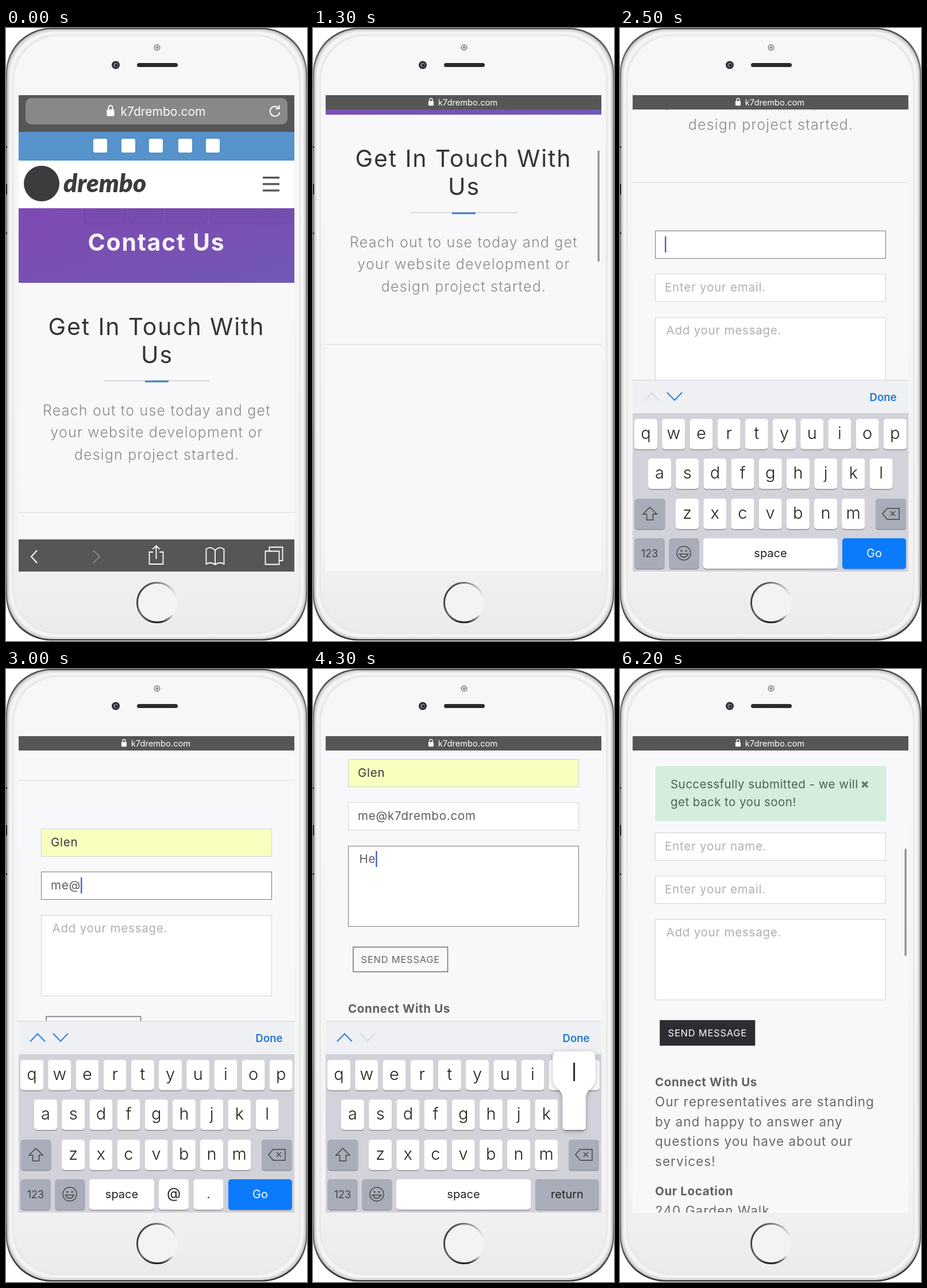
Recreate the animation shown at these times as an HTML page. Size 524 by 1068 pixels, loop 6300 ms.

```html
<!DOCTYPE html>
<html lang="en">
<head>
<meta charset="utf-8">
<title>Contact form on a phone</title>
<style>
  html, body { margin: 0; width: 100%; height: 100%; overflow: hidden; background: #fff; }
  svg { display: block; width: 524px; height: 1068px; }
  text { font-family: Inter, "Open Sans", sans-serif; white-space: pre; }
  .page text { letter-spacing: .038em; }
</style>
</head>
<body>
<svg id="stage" viewBox="0 0 524 1068" xmlns="http://www.w3.org/2000/svg"></svg>
<script>
const LOOP = 6300, STEP = 100;
const NAME = 'Glen', EMAIL = 'me@k7drembo.com', NOTE = 'Hello!';
const SITE = 'k7drembo.com';

// Markup helpers
const rect = (x, y, w, h, fill, more = '') =>
  `<rect x="${x}" y="${y}" width="${w}" height="${h}" fill="${fill}" ${more}/>`;
const text = (x, y, str, size, fill, more = '') =>
  `<text x="${x}" y="${y}" font-size="${size}" fill="${fill}" ${more}>${str}</text>`;
const line = (d, stroke, width = 2, more = '') =>
  `<path d="${d}" fill="none" stroke="${stroke}" stroke-width="${width}" ${more}/>`;
const group = (id, body, more = '') => `<g id="${id}" ${more}>${body}</g>`;
const spaced = em => `style="letter-spacing:${em}em"`;
const MID = 'text-anchor="middle"';

const defs = `<defs>
  <clipPath id="screen"><rect x="22" y="117" width="480" height="830"/></clipPath>
  <linearGradient id="face" x2="0" y2="1">
    <stop stop-color="#f7f7f7"/><stop offset=".85" stop-color="#f3f3f3"/><stop offset="1" stop-color="#ebebeb"/>
  </linearGradient>
  <linearGradient id="rim" x2="0" y2="1">
    <stop stop-color="#4a4a4a"/><stop offset=".1" stop-color="#858585"/>
    <stop offset=".9" stop-color="#808080"/><stop offset="1" stop-color="#2c2c2c"/>
  </linearGradient>
  <linearGradient id="hero" x2="1" y2="1">
    <stop stop-color="#7f4ab3"/><stop offset=".6" stop-color="#7752b2"/><stop offset="1" stop-color="#7059b5"/>
  </linearGradient>
  <linearGradient id="ring" x2="1" y2=".35">
    <stop stop-color="#2b2b2b"/><stop offset=".45" stop-color="#777"/><stop offset="1" stop-color="#f2f2f2"/>
  </linearGradient>
  <linearGradient id="ringLow" y1="0" x2="0" y2="1">
    <stop offset=".8" stop-color="#222" stop-opacity="0"/><stop offset="1" stop-color="#222"/>
  </linearGradient>
  <filter id="soft" x="-30%" y="-20%" width="160%" height="140%">
    <feDropShadow dx="0" dy="2" stdDeviation="4" flood-opacity=".3"/>
  </filter>
</defs>`;

function phone() {
  // Equal radii make the rim thicker at the corners
  const shell = [[0, 'url(#rim)'], [2, '#c4c4c4'], [3.5, '#dedede'], [6, '#f4f4f4'], [11, '#e9e9e9'], [14, 'url(#face)']]
    .map(([d, fill]) => rect(d, d, 524 - 2 * d, 1067 - 2 * d, fill, 'rx="78"')).join('');
  return shell +
    [[206, 3], [272, 18], [356, 3]].map(([y, h]) => rect(0, y, 2, h, '#222')).join('') +
    rect(228, 61, 71, 7, '#2a2a2c', 'rx="3.5"') +
    '<circle cx="191" cy="64.5" r="7" fill="#2b2c31"/><circle cx="191" cy="64.5" r="4" fill="#6d7480"/><circle cx="192" cy="65" r="2" fill="#16171c"/>' +
    '<circle cx="263" cy="34" r="5" fill="#d8d8d8" stroke="#555"/><circle cx="263" cy="34" r="2" fill="#888"/>' +
    '<circle cx="263" cy="1001" r="34.5" fill="#f3f3f3" stroke="url(#ring)" stroke-width="3"/>' +
    '<circle cx="263" cy="1001" r="34.5" fill="none" stroke="url(#ringLow)" stroke-width="3"/>';
}

function header() {
  const keys = [[136, 72], [214, 58], [280, 70], [357, 146]]
    .map(([x, w]) => rect(x, 300, w, 41, '#6c43a2', 'rx="5" fill-opacity=".25" stroke="#5d3c98" stroke-opacity=".5"')).join('');
  return rect(22, 181, 480, 50, '#5692cb') +
    [152, 201, 249, 300, 348].map(x => rect(x, 193, 24, 24, '#fff', 'rx="3"')).join('') +
    rect(22, 314, 480, 130, 'url(#hero)') + keys +
    rect(22, 231, 480, 83, '#fff') +
    '<circle cx="62" cy="271" r="31" fill="#3b3c3e"/>' +
    text(100, 286, 'drembo', 44, '#3b3c3e', 'style="font:italic 900 44px Lato,sans-serif;letter-spacing:0"') +
    [259, 270.2, 281.4].map(y => rect(447, y, 29, 3.4, '#555')).join('') +
    text(262, 388, 'Contact Us', 41, '#f7f2fb', `${MID} font-weight="700" ${spaced(.042)}`);
}

function intro() {
  const big = `${MID} font-weight="400" ${spaced(.045)}`;
  return text(262, 535, 'Get In Touch With', 41, '#343538', big) +
    text(263, 583.5, 'Us', 41, '#343538', big) +
    rect(170, 613.8, 185, 1.6, '#cfcfd2') + rect(242, 614, 41, 3.4, '#4d88c5') +
    ['Reach out to use today and get', 'your website development or', 'design project started.']
      .map((s, i) => text(262.5, 674.5 + i * 38.5, s, 25, '#88898c', `${MID} font-weight="300" ${spaced(.048)}`)).join('') +
    rect(22, 843.5, 480, 1.4, '#e2e2e6');
}

const field = (id, y, h, x) =>
  rect(61.5, y + .5, 401, h - 1, '#fff', `id="${id}Box" stroke="#d6d6da"`) +
  text(x, y + 31 - (h > 60 ? 1 : 0), '', 20.5, '#aaa', `id="${id}"`);

function form() {
  const bold = (y, s) => text(61, y, s, 20.5, '#5f6064', `font-weight="700" ${spaced(.031)}`);
  const body = (y, s) => text(61, y, s, 22.5, '#68696d', spaced(.047));
  return field('name', 928, 49, 78) + field('email', 1003, 49, 78) + field('note', 1079, 141, 80.5) +
    rect(70, 1255.5, 164.5, 43, '#2b2d33', 'id="send" stroke-width="1.6"') +
    text(152.3, 1283, 'SEND MESSAGE', 16.5, '#666', `${MID} id="sendText" ${spaced(.045)}`) +
    bold(1370, 'Connect With Us') +
    ['Our representatives are standing', 'by and happy to answer any', 'questions you have about our', 'services!']
      .map((s, i) => body(1405 + i * 34.7, s)).join('') +
    bold(1560, 'Our Location') + body(1595, '240 Garden Walk') + body(1630, 'Our Town, BB 20000') +
    bold(1680, 'Contact Info') + body(1715, '555-010-0000');
}

function alertBox() {
  return rect(61.5, 928, 402, 96, '#d5eedb', 'rx="4"') +
    text(88, 967, 'Successfully submitted - we will', 20.5, '#4c6354', spaced(.022)) +
    text(88, 998, 'get back to you soon!', 20.5, '#4c6354', spaced(.022)) +
    line('M421.5 955.5l9.5 9.5m0-9.5l-9.5 9.5', '#64756a', 3.4);
}

// Keyboard
const ROWS = [['qwertyuiop', 45, 681], ['asdfghjkl', 69, 750], ['zxcvbnm', 117, 820]];
const PITCH = 48.2, DARK = '#a9adb9';
const key = (x, y, w, fill) =>
  rect(x, y + 1.5, w, 53, '#8f9197', 'rx="5"') + rect(x, y, w, 53, fill, 'rx="5"');
const wide = (x, w, label, fill = '#fff', ink = '#222', size = 20) =>
  key(x, 889, w, fill) + text(x + w / 2, 922, label, size, ink, MID);

function keyboard() {
  const letters = ROWS.map(([row, x0, y]) => [...row].map((c, i) => {
    const x = x0 + i * PITCH;
    return key(x - 20, y, 40, '#fff') + text(x, y + 35, c, 29, '#222', `${MID} font-weight="300"`);
  }).join('')).join('');
  const go = wide(387, 111, 'Go', '#0b7bfb', '#fff');
  return rect(22, 613, 480, 58, '#eff0f3') + rect(22, 613, 480, 1, '#d3d4d8') +
    line('M42 649L55 635.5L68 649', '#2a7fd9', 2, 'id="up"') +
    line('M82 635L95 648.5L108 635', '#2a7fd9', 2, 'id="down"') +
    text(481.5, 650, 'Done', 18.5, '#1f78d6', 'text-anchor="end" font-weight="600"') +
    rect(22, 671, 480, 276, '#d1d2da') + letters +
    key(25.5, 820, 53, DARK) + key(445, 820, 53, DARK) +
    line('M52 835L64 847H57.5V857H46.5V847H40Z', '#444', 1.5) +
    line('M457 846L465 837H486V856H465ZM471 842l8 8m0-8l-8 8', '#444', 1.5) +
    wide(25.5, 52, '123', DARK, '#444', 18) + key(85.5, 889, 52, DARK) +
    '<circle cx="111" cy="915" r="12" fill="none" stroke="#444" stroke-width="1.5"/>' +
    '<circle cx="107" cy="911" r="1.6" fill="#444"/><circle cx="115" cy="911" r="1.6" fill="#444"/>' +
    line('M103.5 916.5H118.5Q111 928 103.5 916.5Z', '#444', 1.5) +
    group('rowName', wide(145, 234, 'space') + go) +
    group('rowEmail', wide(145, 113, 'space') + wide(266, 52, '@', '#fff', '#222', 25) + wide(326.5, 52, '.') + go) +
    group('rowNote', wide(145, 234, 'space') + wide(387, 111, 'return', DARK)) +
    group('pop', '<path d="M-27 -84H27Q37 -84 37 -74V-37C37 -18 20 -20 20 -2V48Q20 53 15 53H-15Q-20 53 -20 48V-2C-20 -20 -37 -18 -37 -37V-74Q-37 -84 -27 -84Z" fill="#fff" filter="url(#soft)"/>' +
      text(0, -32, '', 44, '#222', `${MID} font-weight="300" id="popText"`));
}

function chrome() {
  const lock = rect(-98, -11, 13, 11.5, '#fff', 'rx="1.5"') + line('M-95 -11V-14.5a3.5 3.5 0 0 1 7 0V-11', '#fff', 2);
  return rect(22, 117, 480, 64, '#565656', 'id="bar"') +
    group('pill', rect(34, 122, 456, 46, '#888', 'rx="10"') +
      line('M474.5 139.5A8.5 8.5 0 1 0 476.5 147M475.5 134.5V140.5H469', '#fff', 2)) +
    group('address', lock + text(0, 0, SITE, 21, '#fff', MID)) +
    group('tools', rect(22, 891, 480, 56, '#565656') +
      line('M54 910L44 921L54 932', '#fff') + line('M152 910L163 921L152 932', '#8a8a8a') +
      line('M256 913H249.5V934H273.5V913H267M261.5 925V902M255.5 908L261.5 902L267.5 908', '#fff', 1.8) +
      line('M364 910Q356 902 348.5 908V934Q356 929 364 935Q372 929 379.5 934V908Q372 902 364 910V935', '#fff', 1.8) +
      line('M451.5 911.5H475.5V934.5H451.5ZM458.5 911V904.5H481.5V928H476', '#fff', 1.8));
}

const stage = document.getElementById('stage');
stage.innerHTML = defs + phone() + '<g clip-path="url(#screen)">' + rect(22, 117, 480, 830, '#f8f8fa') +
  group('page', header() + intro() + group('alert', alertBox()) +
    group('form', form()) + rect(0, 0, 2.4, 28, '#3f62d2', 'id="caret"'), 'class="page"') +
  rect(495.5, 0, 3.2, 194, '#8d8d90', 'rx="1.6" id="thumb"') +
  group('keys', keyboard()) + chrome() + '</g>';

const el = {};
stage.querySelectorAll('[id]').forEach(n => el[n.id] = n);
const set = (id, attrs) => { for (const k in attrs) el[id].setAttribute(k, attrs[k]); };
const show = (id, on) => { el[id].style.display = on ? '' : 'none'; };

// Tracks of [time, value]
const SCROLL = [[300, 0], [800, 150], [1300, 293], [1600, 415], [1900, 545], [2100, 603], [2200, 603], [2400, 575],
  [2600, 575], [2800, 650], [4000, 650], [4200, 771], [6000, 771], [6200, 759]];
const COLLAPSE = [[300, 0], [600, 1]];
const FORM_FADE = [[1300, 0], [1700, 1]];
const THUMB = [[300, 0], [400, 1], [2100, 1], [2300, 0], [6000, 0], [6100, 1]];
const KEYS = [[2200, 334], [2300, 160], [2400, 40], [2500, 0], [4700, 0], [4800, 140], [4900, 286], [5000, 334]];
const PRESS = [[4800, 0], [4900, .7], [5100, 1]];

function at(track, t) {
  let prev = track[0];
  for (const p of track) {
    if (t < p[0]) return t <= prev[0] ? prev[1] : prev[1] + (p[1] - prev[1]) * (t - prev[0]) / (p[0] - prev[0]);
    prev = p;
  }
  return prev[1];
}
const clamp = (v, lo, hi) => Math.max(lo, Math.min(hi, v));
const mix = (a, b, k) => a + (b - a) * k;
const grey = (a, b, k) => { const v = Math.round(mix(a, b, k)); return `rgb(${v},${v},${v})`; };

function emailCount(t) {
  if (t < 2800) return 0;
  if (t <= 3000) return 1 + (t - 2800) / 100;
  return t >= 3900 ? EMAIL.length : 3 + Math.round((t - 3000) * 11 / 800);
}

function fill(id, value, hint, focus) {
  el[id].textContent = value || (focus ? '' : hint);
  set(id, { fill: value ? '#5c5d61' : '#b0b0b3' });
  set(id + 'Box', { stroke: focus ? '#78787c' : '#d2d2d6' });
}

function placeCaret(focus) {
  show('caret', focus);
  if (!focus) return;
  const t = el[focus], w = t.textContent ? t.getComputedTextLength() : 0;
  set('caret', { x: +t.getAttribute('x') + w, y: t.getAttribute('y') - 21 });
}

function placePop(c) {
  const row = c && ROWS.find(r => r[0].includes(c));
  show('pop', row);
  if (!row) return;
  set('pop', { transform: `translate(${row[1] + row[0].indexOf(c) * PITCH} ${row[2]})` });
  el.popText.textContent = c;
}

function render(t) {
  const s = at(SCROLL, t), c = at(COLLAPSE, t), press = at(PRESS, t), sent = t >= 6000;
  set('page', { transform: `translate(0 ${-s})` });
  set('form', { transform: `translate(0 ${sent ? 116 : 0})`, opacity: at(FORM_FADE, t) });
  show('alert', sent);

  set('bar', { height: mix(64, 25, c) });
  set('pill', { opacity: 1 - c, transform: `translate(0 ${-20 * c})` });
  set('address', { transform: `translate(${mix(273.5, 269.5, c)} ${mix(153, 135, c)}) scale(${mix(1, .7, c)})` });
  set('tools', { transform: `translate(0 ${56 * c})` });
  set('thumb', sent ? { y: 147 + s * .2187, height: 187 } : { y: 147 + s * .2258, height: 194 });
  set('thumb', { opacity: at(THUMB, t) });

  const focus = t < 2300 || t >= 4800 ? '' : t < 2700 ? 'name' : t < 4000 ? 'email' : 'note';
  const n = emailCount(t), m = clamp((t - 4100) / 100, 0, NOTE.length);
  const named = t >= 2600 && !sent;
  fill('name', named ? NAME : '', 'Enter your name.', focus === 'name');
  fill('email', sent ? '' : EMAIL.slice(0, n), 'Enter your email.', focus === 'email');
  fill('note', sent ? '' : NOTE.slice(0, m), 'Add your message.', focus === 'note');
  set('nameBox', { fill: named ? '#f9ffbf' : '#fff' });
  if (named) set('name', { fill: '#38393c' });
  placeCaret(focus);

  set('send', { 'fill-opacity': press, stroke: grey(119, 45, press) });
  set('sendText', { fill: grey(102, 255, press) });

  const drop = at(KEYS, t), last = t >= 4000;
  show('keys', drop < 334);
  set('keys', { transform: `translate(0 ${drop})` });
  show('rowName', t < 2700);
  show('rowEmail', t >= 2700 && !last);
  show('rowNote', last);
  set('up', { stroke: t < 2700 ? '#d9dade' : '#2a7fd9' });
  set('down', { stroke: last ? '#d9dade' : '#2a7fd9' });
  placePop(t > 3000 && t < 3900 ? EMAIL[n] : last && t < 4700 ? NOTE[m] : '');
}

const start = performance.now();
function tick(now) {
  const t = Math.max(0, now - start) % LOOP;
  render(Math.floor(t / STEP) * STEP);
  requestAnimationFrame(tick);
}
render(0);
requestAnimationFrame(tick);
</script>
</body>
</html>
```
